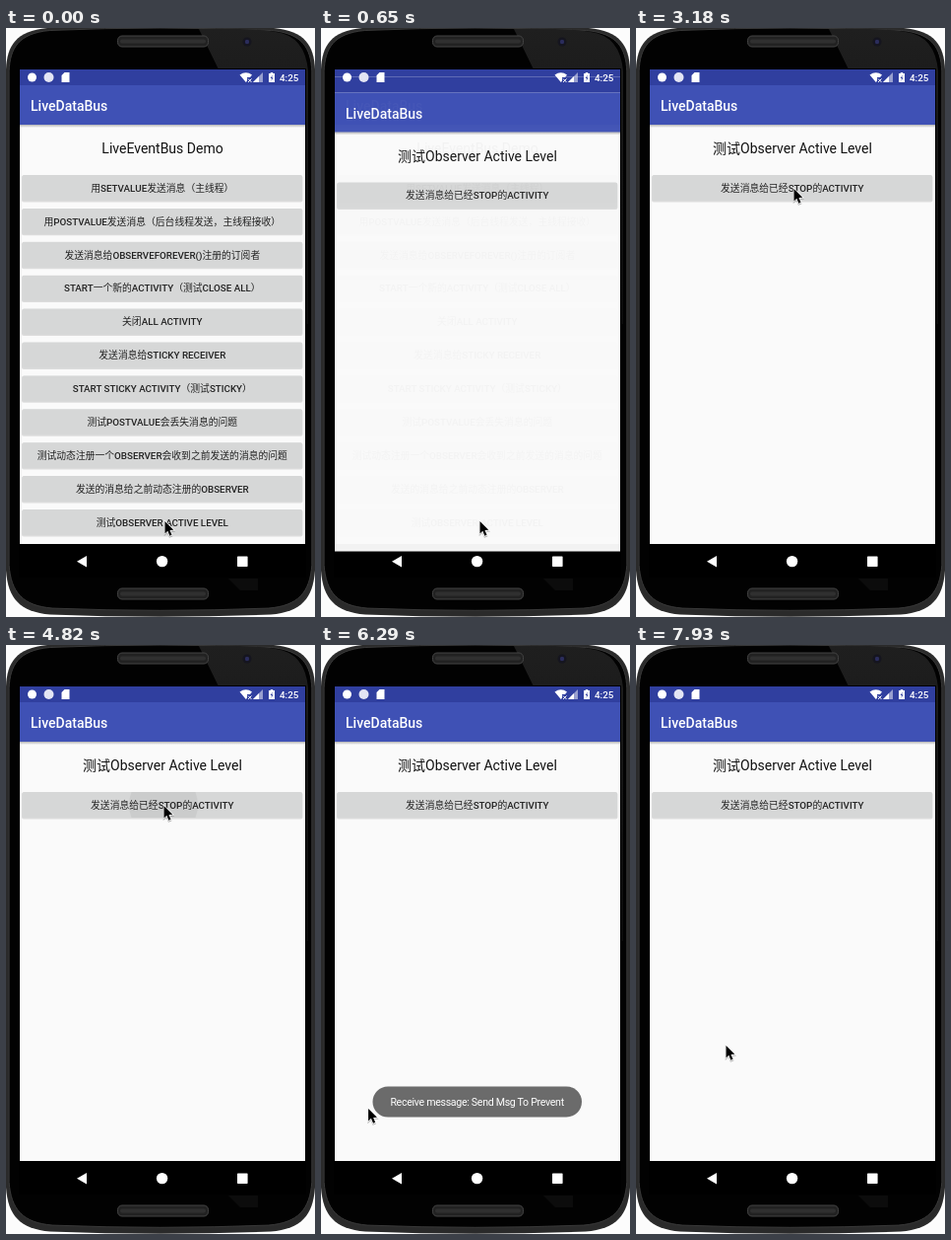
An HTML page that plays this animation: 314x597 px, repeating every 8000 ms.

```html
<!DOCTYPE html>
<html lang="zh-CN">
<head>
<meta charset="utf-8">
<title>LiveDataBus</title>
<style>
  html, body { margin: 0; width: 100%; height: 100%; overflow: hidden; background: #fcfcfc; }
  svg { display: block; width: 314px; height: 597px; }
  text { font-family: Roboto, "Noto Sans CJK SC", "Noto Sans CJK", sans-serif; }
  .bar { font-size: 14px; font-weight: 500; fill: #fff; }
  .heading { font-size: 14px; fill: #111; text-anchor: middle; }
  .label { font-size: 9.8px; fill: #222; text-anchor: middle; }
  .label tspan { font-weight: 500; }
  .clock { font-size: 9.8px; font-weight: 500; fill: #fff; }
  .toast { font-size: 10.6px; letter-spacing: -.3px; fill: #fff; text-anchor: middle; }
</style>
</head>
<body>
<svg viewBox="0 0 314 597">
  <defs>
    <linearGradient id="shade" x2="0" y2="1">
      <stop stop-color="#000" stop-opacity=".28"/>
      <stop offset="1" stop-color="#000" stop-opacity="0"/>
    </linearGradient>
    <linearGradient id="gloss" x2="0" y2="1">
      <stop stop-color="#1f1f1f"/>
      <stop offset="1" stop-color="#0c0c0c"/>
    </linearGradient>
    <clipPath id="screen"><rect x="14" y="42" width="290" height="489"/></clipPath>
    <clipPath id="firstButton"><rect x="16.5" y="149" width="284.5" height="26" rx="1.5"/></clipPath>
    <clipPath id="lastButton"><rect x="16.5" y="488" width="284.5" height="26" rx="1.5"/></clipPath>
    <path id="shell" d="M0 42C1 18 10 3 42 0Q157 -5 272 0C304 3 313 18 314 42
      V550C312 578 300 592 269 594.5Q157 599 45 594.5C14 592 2 578 0 550Z"/>
    <g id="speaker">
      <rect x="113.5" y="-5.5" width="92" height="11" rx="4.5" fill="#222" stroke="#444"/>
      <path d="M118 0H201" stroke="#303030" stroke-width="4" stroke-linecap="round"/>
    </g>
  </defs>

  <g id="phone">
    <use href="#shell" fill="#2a2a2a"/>
    <use href="#shell" transform="translate(3.1 2.5) scale(.98 .985)" fill="#020202" stroke="#3a3a3a"/>
    <path d="M196 1Q250 0 274 4Q304 8 307 44V300H304V42H216Z" fill="url(#gloss)"/>
    <path d="M226 558H256V570H238Z" fill="#0c0c0c"/>
    <rect x="13" y="41" width="292" height="516" fill="#000"/>
    <use href="#speaker" y="13.5"/>
    <use href="#speaker" y="573.5"/>
    <circle cx="245" cy="14" r="4.5" fill="#15151f"/>
    <circle cx="245" cy="14" r="2.2" fill="#2b2d5c"/>
  </g>

  <g id="pages" clip-path="url(#screen)"></g>

  <g fill="#fff">
    <circle cx="26.5" cy="50" r="4.5"/>
    <circle cx="43.5" cy="50" r="5" fill="#e3e5f4"/>
    <path d="M59.5 45H64.5V55H56.5V48Z"/>
    <path d="M237.5 47.5Q243.8 42.8 250 47.5L248 50H245V53.7L243.8 55Z"/>
    <path d="M246 51.5l3.5 3.5m0-3.5l-3.5 3.5" stroke="#fff"/>
    <path d="M251 55L261 45V55Z" opacity=".5"/>
    <path d="M251 55L257 49V55Z"/>
    <path d="M268.8 45H271.2V46H273V55H267V46H268.8Z"/>
    <path d="M270.8 47.5L268.7 51H270L269.5 53.7L271.5 50.2H270.2Z" fill="#303f9f"/>
    <text class="clock" x="278" y="53.6">4:25</text>
    <path d="M72 540.7L82 535V546.4Z"/>
    <circle cx="158.6" cy="540.6" r="5.7"/>
    <rect x="235" y="535.4" width="10.6" height="10.6" rx=".7"/>
  </g>

  <g id="toast">
    <rect x="52.5" y="447.5" width="212.5" height="31" rx="15.5" fill="#6b6b6b"/>
    <text class="toast" x="158.6" y="467.3">Receive message: Send Msg To Prevent</text>
  </g>

  <g id="cursor">
    <path d="M.5 1V13.4L3.3 10.8L5.4 15.7L7.5 14.8L5.5 10.1L9.3 9.8Z"
      fill="#000" stroke="#fff" stroke-width="1.5" paint-order="stroke"
      style="filter:drop-shadow(0 1px .6px rgba(0,0,0,.3))"/>
  </g>
</svg>

<script>
const LOOP = 8000;
const BEAT = 148.6;   // the picture advances once per beat
const OPEN = 500;     // beat 0: the last button is tapped
const SEND = 29;      // beat of the tap on the send button
const FADE = 43;      // beat at which the toast starts to leave
const $ = id => document.getElementById(id);
const clamp = v => Math.min(1, Math.max(0, v));
const smooth = v => v * v * (3 - 2 * v);

// Latin runs are medium weight, Chinese stays regular.
const mixed = s => s.replace(/[A-Z()]+(?: [A-Z()]+)*/g, '<tspan>$&</tspan>');

function button(text, i) {
  const y = 149 + i * 33.9;
  return `<rect x="16" y="${y + .4}" width="285.5" height="27" rx="2" fill="#000" opacity=".12"/>
    <rect x="16.5" y="${y}" width="284.5" height="26" rx="1.5" fill="#d6d7d7"/>
    <text class="label" x="158.8" y="${y + 16.7}">${mixed(text)}</text>`;
}

function page(id, heading, labels, press) {
  return `<g id="${id}">
    <rect x="14" y="42" width="290" height="481" fill="#fafafa"/>
    <rect x="14" y="42" width="290" height="16" fill="#303f9f"/>
    <rect x="14" y="58" width="290" height="40" fill="#3f51b5"/>
    <rect x="14" y="98" width="290" height="3" fill="url(#shade)"/>
    <text class="bar" x="25" y="84">LiveDataBus</text>
    <text class="heading" x="159" y="127">${heading}</text>
    ${labels.map(button).join('')}
    ${press}
  </g>`;
}

const ripple = (id, y, clip) =>
  `<g clip-path="url(#${clip})"><circle id="${id}" cx="160" cy="${y}" opacity=".05"/></g>`;

$('pages').innerHTML =
  page('menu', 'LiveEventBus Demo', [
    '用SETVALUE发送消息（主线程）',
    '用POSTVALUE发送消息（后台线程发送，主线程接收）',
    '发送消息给OBSERVEFOREVER()注册的订阅者',
    'START一个新的ACTIVITY（测试CLOSE ALL）',
    '关闭ALL ACTIVITY',
    '发送消息给STICKY RECEIVER',
    'START STICKY ACTIVITY（测试STICKY）',
    '测试POSTVALUE会丢失消息的问题',
    '测试动态注册一个OBSERVER会收到之前发送的消息的问题',
    '发送的消息给之前动态注册的OBSERVER',
    '测试OBSERVER ACTIVE LEVEL'
  ], ripple('menuRipple', 500, 'lastButton')) +
  page('detail', '测试Observer Active Level', ['发送消息给已经STOP的ACTIVITY'],
    ripple('sendRipple', 162, 'firstButton'));

// Eased curves through a bend, between two beats.
const HOME = [161, 499];
const moves = [
  { from: 4, to: 7, bend: [160, 340], end: [174, 244] },
  { from: 8, to: 12, bend: [128, 195], end: [163, 185] },
  { from: 13, to: 18, bend: [163, 172], end: [160, 162] },
  { from: 33, to: 41, bend: [-7, 430], end: [64, 494] },
  { from: 41, to: 44, bend: [150, 505], end: [219, 481] },
  { from: 44, to: 50, bend: [110, 385], end: [91, 405] }
];

function cursorAt(beat) {
  let pos = HOME;
  for (const { from, to, bend, end } of moves) {
    if (beat <= from) break;
    const u = smooth(clamp((beat - from) / (to - from)));
    const v = 1 - u;
    pos = pos.map((p, i) => v * v * p + 2 * u * v * bend[i] + u * u * end[i]);
  }
  return pos;
}

function rippleRadius(beat, start, length) {
  const age = beat - start;
  return age >= 0 && age < length ? 35 * (age + 1) : 0;
}

function draw(t) {
  const beat = Math.floor((t - OPEN) / BEAT + .05);
  const opened = clamp(beat / 2);
  const [x, y] = cursorAt(beat);
  $('cursor').setAttribute('transform', `translate(${x} ${y})`);
  $('detail').setAttribute('transform', `translate(0 ${15 * (1 - opened)})`);
  $('detail').setAttribute('opacity', 1 - (1 - opened) ** 5);
  $('toast').setAttribute('opacity', clamp((beat - SEND) / 3) - clamp((beat - FADE) / 3));
  $('menuRipple').setAttribute('r', rippleRadius(beat, 0, 1));
  $('sendRipple').setAttribute('r', rippleRadius(beat, SEND, 3));
}

const start = performance.now();
function tick(now) {
  draw(Math.max(0, now - start) % LOOP);
  requestAnimationFrame(tick);
}
draw(0);
requestAnimationFrame(tick);
</script>
</body>
</html>
```
